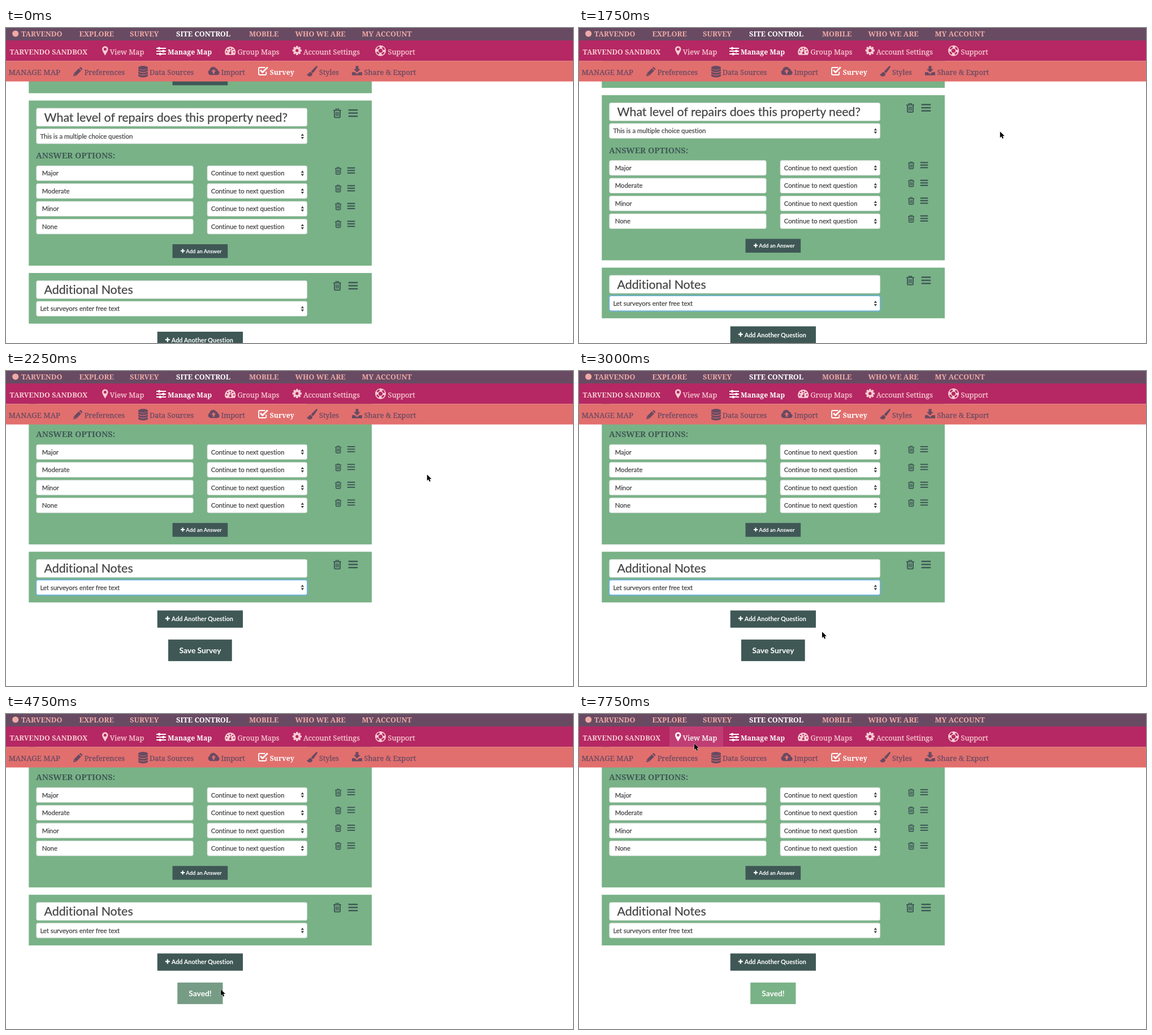
Recreate the animation shown at these times as an HTML page. Size 1003 by 558 pixels, loop 8000 ms.

```html
<!DOCTYPE html>
<html lang="en">
<head>
<meta charset="utf-8">
<title>Survey editor</title>
<style>
html, body { margin: 0; width: 100%; height: 100%; overflow: hidden; background: #fff; }
svg { display: block; width: 100%; height: 100%; }
text { white-space: pre; font-variant-ligatures: none; stroke-width: .25px; }
.slab { font-family: "Noto Serif", serif; }
.sans { font-family: Lato, sans-serif; }
.bold { font-weight: 700; stroke: none; }
</style>
</head>
<body>
<svg id="stage" viewBox="0 0 1003 558"></svg>
<script>
const LOOP = 8000, STEP = 250;
const GREEN = '#79b287', DARK = '#3f5856', PLUM = '#684a62', ROSE = '#f7ccd2', PEACH = '#eea9a6', WHITE = '#fff';
const MAGENTA = '#b52863', CORAL = '#e16f6e';

const rect = (x, y, w, h, fill, more = '') =>
  `<rect x="${x}" y="${y}" width="${w}" height="${h}" fill="${fill}" ${more}/>`;
const text = (x, y, size, fill, str, cls = 'sans', more = '') =>
  `<text x="${x}" y="${y}" font-size="${size}" fill="${fill}" stroke="${fill}" class="${cls}" ${more}>${str}</text>`;
const path = (d, more = '') => `<path d="${d}" ${more}/>`;
const line = (d, w, more = '') => path(d, `fill="none" stroke="currentColor" stroke-width="${w}" ${more}`);
const place = (x, y, color, body, scale = 1) =>
  `<g transform="translate(${x} ${y}) scale(${scale})" fill="currentColor" color="${color}">${body}</g>`;

const gearTeeth = Array.from({ length: 8 }, (_, i) =>
  `<rect x="6.3" y="0" width="3.6" height="4" rx=".6" transform="rotate(${i * 45} 8.1 8.1)"/>`).join('');
const gaugeDots = [180, 225, 270, 315, 360].map(a => {
  const r = a * Math.PI / 180;
  return `<circle cx="${9.5 + 6.4 * Math.cos(r)}" cy="${9.6 + 6.4 * Math.sin(r)}" r="1.3" fill="${MAGENTA}"/>`;
}).join('');

const icon = {
  pin: path('M5.3 0A5.2 5.2 0 0 0 0 5.3C0 8 3.2 12.6 5.3 16.5C7.4 12.6 10.6 8 10.6 5.3A5.2 5.2 0 0 0 5.3 0ZM5.3 2.8A2.5 2.5 0 1 1 5.3 7.8A2.5 2.5 0 1 1 5.3 2.8Z', 'fill-rule="evenodd"'),
  sliders: line('M0 2.5H17M0 7.5H17M0 12.5H17', 1.9) +
    rect(3.2, .3, 3.6, 4.4, 'currentColor', 'rx=".8"') + rect(10.6, 5.3, 3.6, 4.4, 'currentColor', 'rx=".8"') +
    rect(5, 10.3, 3.6, 4.4, 'currentColor', 'rx=".8"'),
  gauge: path('M9.5 0A9.5 9.5 0 0 0 1.5 14.7H17.5A9.5 9.5 0 0 0 9.5 0Z') + gaugeDots +
    `<g color="${MAGENTA}">${line('M9.5 11L11 5.5', 1.3)}<circle cx="9.5" cy="11.3" r="2" fill="currentColor"/></g>`,
  gear: gearTeeth + '<circle cx="8.1" cy="8.1" r="4.4" fill="none" stroke="currentColor" stroke-width="3.6"/>',
  ring: [[8.7, 1.6, ''], [4.3, 1.5, ''], [6.5, 4, 'stroke-dasharray="5.105" stroke-dashoffset="2.55"']].map(([r, w, more]) =>
    `<circle cx="9.5" cy="9.5" r="${r}" fill="none" stroke="currentColor" stroke-width="${w}" ${more}/>`).join(''),
  pencil: path('M0 16.5L1.2 11.2L9.8 2.6L13.9 6.7L5.3 15.3ZM10.8 1.6L12 .5Q12.8 -.2 13.6 .5L16 2.9Q16.7 3.7 16 4.5L14.9 5.7Z') +
    line('M1.9 12.3L4.2 14.6', 1, `color="${CORAL}"`),
  data: path('M0 3A8.5 3 0 0 1 17 3V4A8.5 3 0 0 1 0 4Z') +
    [5.6, 10.2, 14.8].map(y => path(`M0 ${y}Q8.5 ${y + 4.4} 17 ${y}V${y + 2.6}A8.5 3 0 0 1 0 ${y + 2.6}Z`)).join(''),
  cloud: path('M4.8 15A4.8 4.8 0 0 1 3 5.9A6 6 0 0 1 14.3 3.8A3.3 3.3 0 0 1 17.4 7.2A4 4 0 0 1 17 15Z') +
    path('M10 4.8L14.2 9H11.5V12.8H8.5V9H5.8Z', `fill="${CORAL}"`),
  check: line('M14.3 9.5V13Q14.3 15 12.3 15H3Q1 15 1 13V4Q1 2 3 2H12.3', 1.9) + line('M4 6.8L7.8 10.5L16.8 1.5', 2.8),
  brush: path('M18.3 .3Q19.5 1 18.7 2.6L12.3 11.8Q10.8 13.2 8.7 11.6Q7.4 10 8.8 8.6L16.5 .7Q17.5 -.2 18.3 .3Z') +
    path('M7.3 10.7Q7.7 13 10.2 13.4Q10 18.6 5 18.7Q1.2 18.7 0 14.3Q2.2 15.6 3.2 13.4Q4.5 10.5 7.3 10.7Z'),
  download: path('M6.5 0H11.5V5.5H15L9 11.5L3 5.5H6.5Z') + path('M0 11H5L9 14.5L13 11H18V16.5H0Z'),
  trash: line('M0 3.3H14M4.5 3V1H9.5V3', 1.7) +
    line('M2 3.5V14.3Q2 16 3.5 16H10.5Q12 16 12 14.3V3.5', 2) + line('M4.7 6V13.5M7 6V13.5M9.3 6V13.5', 1.4),
  bars: line('M0 1.3H16.5M0 6.8H16.5M0 12.3H16.5', 2.5),
  plus: line('M4 0V8M0 4H8', 2.3),
  arrows: path('M0 4L2.7 0L5.4 4ZM0 6L2.7 10L5.4 6Z')
};

const field = (x, y, w, h) => rect(x, y, w, h, WHITE, 'rx="3" stroke="#c6d3ca" stroke-width=".8"');
const select = (x, y, w, label) => field(x, y, w, 26.5) + text(x + 6.7, y + 17.4, 11.35, '#444', label) +
  place(x + w - 11, y + 8.4, '#444', icon.arrows);
const tools = y => place(579, y, DARK, icon.trash) + place(605.7, y + 1.5, DARK, icon.bars);
const smallTools = y => place(582, y, DARK, icon.trash, .8) + place(603.8, y + .7, DARK, icon.bars, .82);
const title = (y, label) => field(53.7, y, 479, 32) + text(67.5, y + 23.7, 21.35, '#444', label);
const panel = (y, h) => rect(40.3, y, 606.7, h, GREEN);
const answer = (label, i) => {
  const y = 244 + i * 31.5;
  return field(53.7, y, 277.5, 26.5) + text(63.7, y + 17.4, 11.35, '#444', label) +
    select(356, y, 176.7, 'Continue to next question') + smallTools(y + 2.1);
};

const form = panel(60, 55.5) + rect(294.5, 77, 97.7, 24.5, DARK) +
  panel(128.5, 292.5) + title(142, 'What level of repairs does this property need?') + tools(142.5) +
  select(53.7, 178.5, 479, 'This is a multiple choice question') +
  text(53, 231, 14.4, DARK, 'ANSWER OPTIONS:', 'slab bold') +
  ['Major', 'Moderate', 'Minor', 'None'].map(answer).join('') +
  rect(294.5, 383, 97.7, 24.5, DARK) + place(309, 391.2, WHITE, icon.plus, .9) +
  text(318.3, 398.5, 9.4, WHITE, 'Add an Answer', 'sans bold') +
  panel(434, 89.7) + title(447.5, 'Additional Notes') + tools(448.3) +
  select(53.7, 484, 479, 'Let surveyors enter free text') +
  `<g id="focus" stroke="#66afe9">${rect(52.7, 483, 481, 28.5, 'none', 'rx="4" stroke-width="2" opacity=".35"')}
    ${rect(53.7, 484, 479, 26.5, 'none', 'rx="3"')}</g>` +
  rect(267.7, 538, 151.3, 30.5, DARK) + place(281.8, 548.2, WHITE, icon.plus) +
  text(292.7, 557, 10.9, WHITE, 'Add Another Question', 'sans bold') +
  `<g id="save"><rect id="saveBox" y="589.5" height="38.2"/>
    ${text(343.5, 613.7, 13.8, WHITE, '', 'sans bold', 'id="saveLabel" text-anchor="middle"')}</g>`;

const topItems = [['EXPLORE', 129.5], ['SURVEY', 219], ['SITE CONTROL', 301], ['MOBILE', 430], ['WHO WE ARE', 511.5], ['MY ACCOUNT', 629.5]];
const mapItems = [['View Map', 183.7, 'pin', 170, 32.3], ['Manage Map', 286, 'sliders', 266, 33.5], ['Group Maps', 409.5, 'gauge', 387.2, 33],
  ['Account Settings', 526, 'gear', 506.7, 31.8], ['Support', 675.5, 'ring', 653, 30.7]];
const editItems = [['Preferences', 138.7, 'pencil', 119, 69], ['Data Sources', 254, 'data', 234, 67], ['Import', 380.5, 'cloud', 357.3, 68.3],
  ['Survey', 466.7, 'check', 446, 68], ['Styles', 554, 'brush', 532, 67], ['Share &amp; Export', 633.5, 'download', 612, 67.3]];
const menu = (items, y, color, active) => items.map(([label, x, name, ix, iy]) => {
  const on = label === active, c = on ? WHITE : color;
  return place(ix, iy, c, icon[name]) + text(x, y, on ? 12.2 : 12.7, c, label, on ? 'slab bold' : 'slab');
}).join('');

const header = rect(0, 0, 1003, 22, '#684b63') + rect(0, 22, 1003, 36.3, MAGENTA) + rect(0, 58.3, 1003, 36.4, CORAL) +
  `<circle cx="16.7" cy="10" r="5.6" fill="${PEACH}"/>` + text(27, 14.5, 12.7, PEACH, 'TARVENDO', 'slab bold') +
  topItems.map(([label, x]) => text(x, 14.5, 12.7, label === 'SITE CONTROL' ? WHITE : PEACH, label, 'slab bold')).join('') +
  text(6.5, 46.8, 12.5, ROSE, 'TARVENDO SANDBOX', 'slab bold') + text(4.5, 82.5, 13.2, PLUM, 'MANAGE MAP', 'slab') +
  menu(mapItems, 47, ROSE, 'Manage Map') + menu(editItems, 83, PLUM, 'Survey') +
  `<g id="hover">${rect(160, 22, 95, 36.3, '#bf3d73')}${menu(mapItems.slice(0, 1), 47, WHITE)}</g>`;

const pointer = path('M0 0V12L2.8 9.5L4.6 13.8L6.8 12.9L5 8.7H8.8Z', 'id="pointer" stroke="#fff" paint-order="stroke"');

const $ = id => document.getElementById(id);
$('stage').innerHTML = `<g id="form">${form}</g>${header}${pointer}`;

// Keys are [time, ...values], joined by straight lines
function track(keys, t) {
  const i = keys.findIndex(k => k[0] > t);
  if (i === 0) return keys[0].slice(1);
  if (i < 0) return keys[keys.length - 1].slice(1);
  const a = keys[i - 1], b = keys[i], f = (t - a[0]) / (b[0] - a[0]);
  return a.slice(1).map((v, n) => v + (b[n + 1] - v) * f);
}
const scroll = [[1500, 0], [1750, -9.5], [2000, -54.6], [2250, -113.8]];
const move = [[2250, 744.8, 183.5], [2500, 680, 240], [2750, 515, 385], [3000, 430, 462], [3250, 390, 486], [3500, 381, 489],
  [3750, 380, 488], [6000, 380, 488], [6250, 418, 491], [6500, 435, 489], [6750, 416, 455], [7000, 320, 325], [7250, 198, 166],
  [7500, 199, 78], [7750, 204, 52.5]];
const fade = [[3250, 1], [3500, .85], [6000, .85], [6250, .89], [6500, 1]];
const tint = [[4750, 95, 139, 113], [5000, 112, 165, 128], [5250, 121, 178, 135]];
const show = (id, on) => $(id).setAttribute('visibility', on ? 'visible' : 'hidden');

function draw(t) {
  const saved = t >= 4750, box = $('saveBox');
  $('form').setAttribute('transform', `translate(0 ${track(scroll, t)[0]})`);
  $('pointer').setAttribute('transform', `translate(${track(move, t).join(' ')}) scale(.9)`);
  show('pointer', t >= 1750);
  show('focus', t >= 1250 && t < 4000);
  show('hover', t >= 7750);
  box.setAttribute('x', saved ? 303.2 : 287);
  box.setAttribute('width', saved ? 80.3 : 112.7);
  box.setAttribute('fill', saved ? `rgb(${track(tint, t).map(Math.round)})` : DARK);
  $('saveLabel').textContent = saved ? 'Saved!' : 'Save Survey';
  $('save').setAttribute('opacity', track(fade, t)[0]);
}

function tick() {
  draw(Math.floor(performance.now() % LOOP / STEP) * STEP);
  requestAnimationFrame(tick);
}
tick();
</script>
</body>
</html>
```
